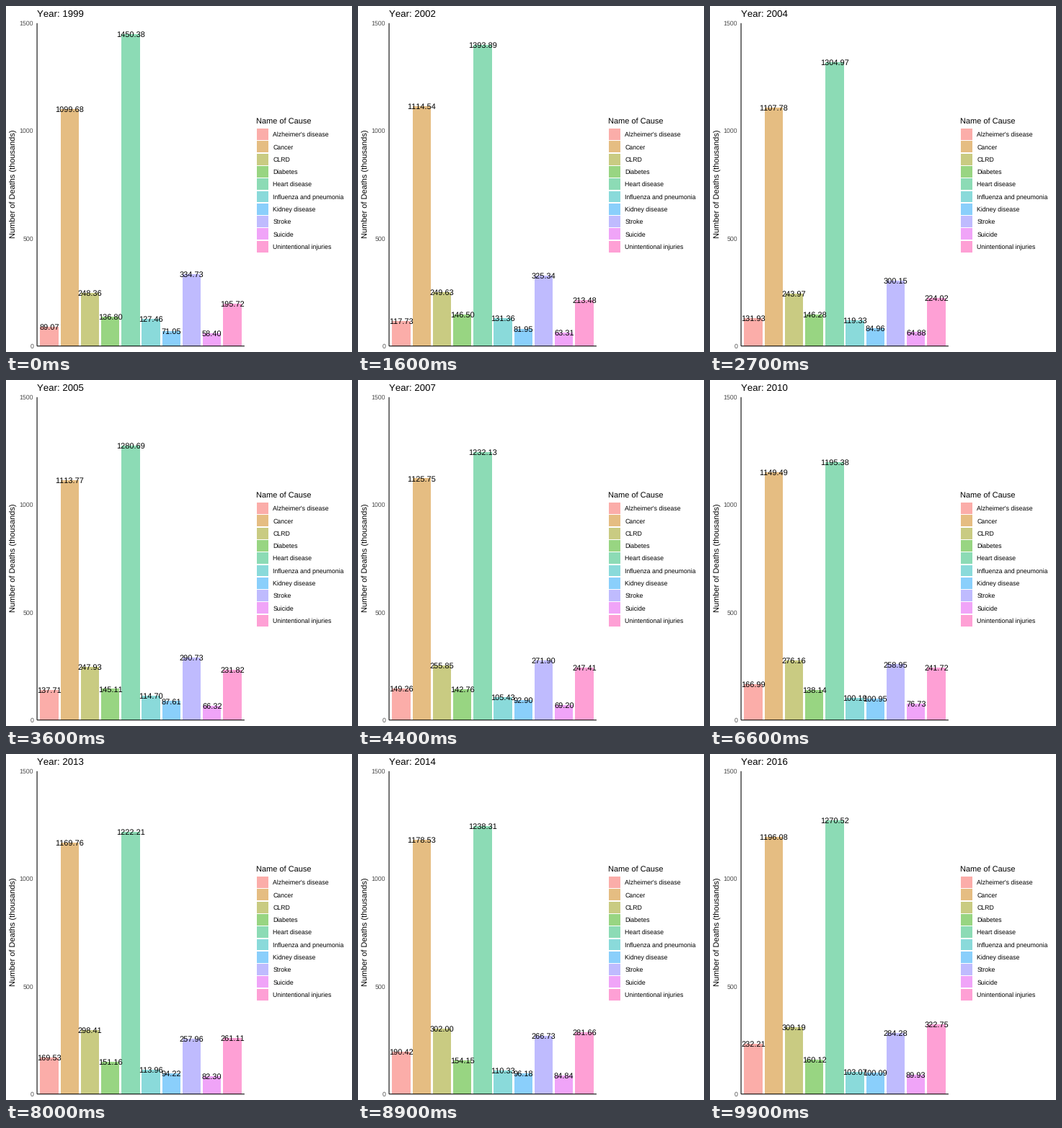
A matplotlib script that plays this animation: 480 px wide and 480 px high, repeating every 10 s.

```python
import numpy as np
import matplotlib.pyplot as plt
from matplotlib.animation import FuncAnimation
from matplotlib.patches import Rectangle

plt.rcParams["font.family"] = "Liberation Sans"
plt.rcParams["text.hinting"] = "no_hinting"
plt.rcParams["text.kerning_factor"] = 6

SIZE, DPI = 480, 72
FRAMES, INTERVAL = 100, 100
LEFT, RIGHT, TOP, BASE = 43.07, 330.9, 23.8, 471.76
KEY_X, KEY_Y, KEY = 347.4, 178.1, 17.28
CAP = 0.358  # half the height of a digit, in em

# Thousands of deaths at a few key years; the years between are interpolated.
KEY_YEARS = [1999, 2002, 2004, 2007, 2010, 2013, 2016]
CAUSES = {
    "Alzheimer's disease": ("#fbada9", [89.07, 117.73, 131.93, 149.26, 166.99, 169.53, 232.21]),
    "Cancer": ("#e5bd82", [1099.68, 1114.54, 1107.78, 1125.75, 1149.49, 1169.76, 1196.08]),
    "CLRD": ("#c9cb82", [248.36, 249.63, 243.97, 255.85, 276.16, 298.41, 309.19]),
    "Diabetes": ("#98d582", [136.80, 146.50, 146.28, 142.76, 138.14, 151.16, 160.12]),
    "Heart disease": ("#8cdbb5", [1450.38, 1393.89, 1304.97, 1232.13, 1195.38, 1222.21, 1270.52]),
    "Influenza and pneumonia": ("#8adada", [127.46, 131.36, 119.33, 105.43, 100.19, 113.96, 103.07]),
    "Kidney disease": ("#8acffb", [71.05, 81.95, 84.96, 92.90, 100.95, 94.22, 100.09]),
    "Stroke": ("#bfbbfe", [334.73, 325.34, 300.15, 271.90, 258.95, 257.96, 284.28]),
    "Suicide": ("#f0a4f8", [58.40, 63.31, 64.88, 69.20, 76.73, 82.30, 89.93]),
    "Unintentional injuries": ("#fea0d5", [195.72, 213.48, 224.02, 247.41, 241.72, 261.11, 322.75]),
}

years = np.arange(KEY_YEARS[0], KEY_YEARS[-1] + 1)
span = len(years) - 1
# Each year begins on a whole frame.
starts = np.round(np.arange(span + 1) * (FRAMES - 1) / span)
data = np.array([np.interp(years, KEY_YEARS, v) for _, v in CAUSES.values()])

fig = plt.figure(figsize=(SIZE / DPI, SIZE / DPI), dpi=DPI, facecolor="white")
ax = fig.add_axes([0, 0, 1, 1])
ax.set_xlim(0, SIZE)
ax.set_ylim(SIZE, 0)
ax.axis("off")


def to_y(value):
    return BASE - value * (BASE - TOP) / 1500


def text(x, y, s, size, **kw):
    kw = {"va": "baseline", "color": "black", "zorder": 3, **kw}
    return ax.text(x, y, s, fontsize=size, **kw)


def box(x, y, w, h, color):
    return ax.add_patch(Rectangle((x, y), w, h, facecolor=color, linewidth=0, snap=True))


def line(xs, ys):
    ax.plot(xs, ys, color="black", lw=1.07, zorder=4, snap=False, solid_capstyle="butt")


# Axes
line([LEFT, LEFT], [TOP, BASE])
line([LEFT, RIGHT], [BASE, BASE])
for tick in range(0, 1501, 500):
    text(LEFT - 4.95, to_y(tick) + CAP * 8.8, str(tick), 8.8, ha="right", color="#4d4d4d")
text(13.5, 247, "Number of Deaths (thousands)", 11, ha="center",
     rotation=90, rotation_mode="anchor")
title = text(LEFT, 15, "", 13.2)

# Legend, bars and their labels
text(KEY_X, 163.6, "Name of Cause", 11)
step = (RIGHT - LEFT) / (len(CAUSES) + 0.2)
bars, labels = [], []
for i, (name, (color, _)) in enumerate(CAUSES.items()):
    y = KEY_Y + i * KEY
    box(KEY_X + 0.7, y - KEY / 2 + 0.7, KEY - 1.4, KEY - 1.4, color)
    text(KEY_X + KEY + 5.5, y + CAP * 8.8, name, 8.8)
    x = LEFT + step * (0.6 + i)
    bars.append(box(x - 0.45 * step, BASE, 0.9 * step, 0, color))
    labels.append(text(x, BASE, "", 11, ha="center"))


def update(i):
    title.set_text(f"Year: {round(years[0] + span * i / (FRAMES - 1))}")
    k = min(np.searchsorted(starts, i, side="right") - 1, span - 1)
    t = (i - starts[k]) / (starts[k + 1] - starts[k])
    heights = data[:, k] * (1 - t) + data[:, k + 1] * t
    shown = data[:, k + int(t >= 0.5)]  # labels jump halfway through a year
    for bar, label, h, value in zip(bars, labels, heights, shown):
        y = to_y(h)
        bar.set_y(y)
        bar.set_height(BASE - y)
        label.set_y(y + CAP * 11)
        label.set_text(f"{value:.2f}")
    return [title, *bars, *labels]


anim = FuncAnimation(fig, update, frames=FRAMES, interval=INTERVAL,
                     init_func=lambda: update(0), repeat=True, repeat_delay=0)
plt.show()
```
